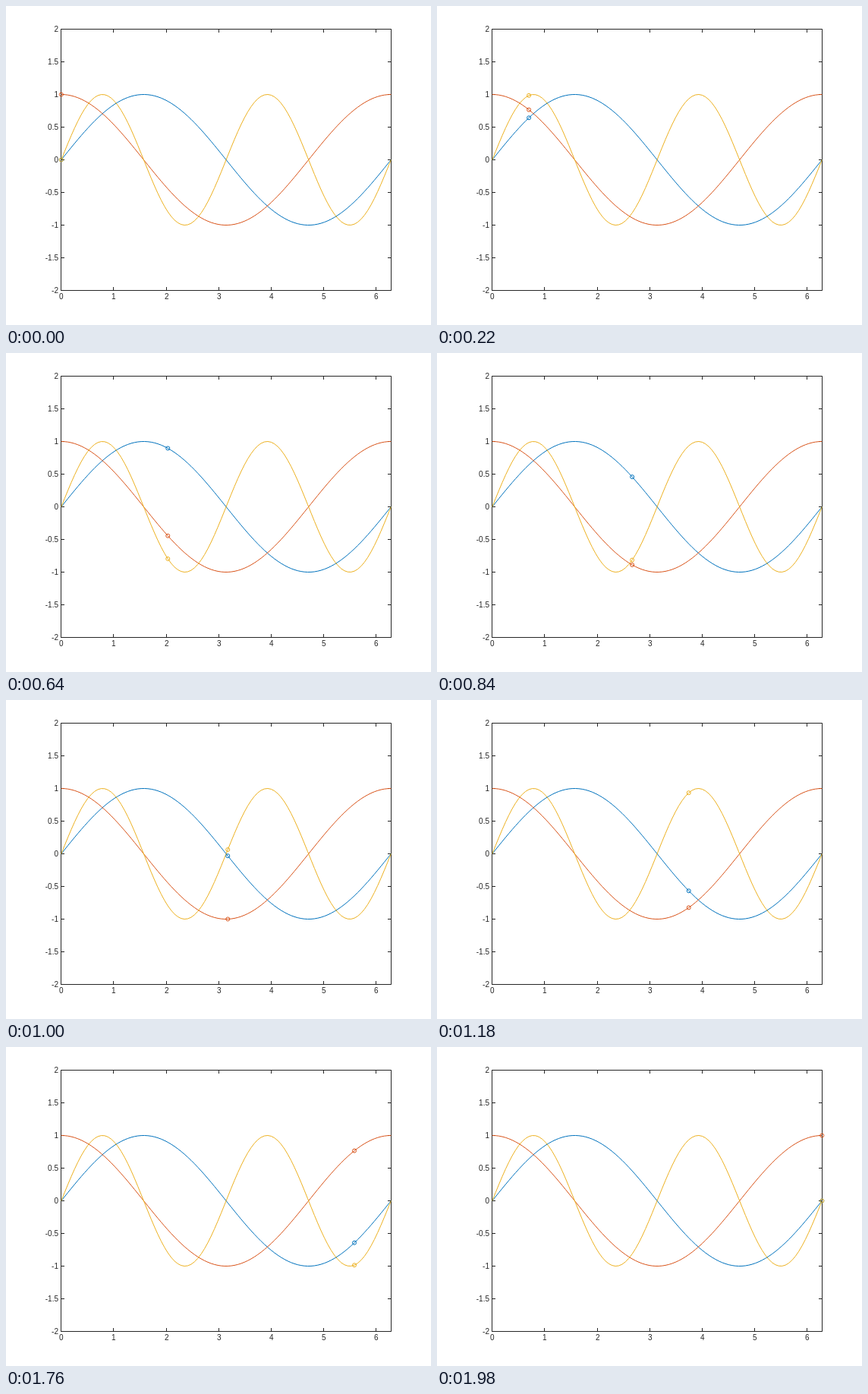
Write an HTML page that moves like this. It is 560 px wide and 420 px high and loops after 2 s.

```html
<!DOCTYPE html>
<html>
<head>
<meta charset="utf-8">
<style>
  html, body { margin: 0; width: 100%; height: 100%; overflow: hidden; background: #fff; }
  svg { display: block; }
  text { font: 10px "Liberation Sans", Arial, sans-serif; fill: #262626; }
  path, circle { fill: none; stroke-width: 1; }
</style>
</head>
<body>
<svg id="plot" width="560" height="420" viewBox="0 0 560 420"></svg>
<script>
const svg = document.getElementById('plot');
const LOOP = 2000, STEPS = 100, SPAN = 2 * Math.PI;
const LEFT = 72.5, RIGHT = 507.5, TOP = 30.5, BOTTOM = 374.5, TICK = 4.5;

const px = x => 72.8 + x / SPAN * 434.5;
const py = y => 202.5 - y * 86;
const snap = v => Math.floor(v) + 0.5;
const sample = k => SPAN * k / (STEPS - 1);

function add(tag, attrs, text = '') {
  const el = document.createElementNS('http://www.w3.org/2000/svg', tag);
  for (const name in attrs) el.setAttribute(name, attrs[name]);
  el.textContent = text;
  return svg.appendChild(el);
}

// Axes box, inward ticks on all sides, labels
let axes = `M${LEFT} ${TOP}H${RIGHT}V${BOTTOM}H${LEFT}Z`;
for (let x = 0; x <= 6; x++) {
  const p = snap(px(x));
  axes += `M${p} ${TOP}v${TICK}M${p} ${BOTTOM}v${-TICK}`;
  add('text', { x: p + 0.2, y: 385.5, 'text-anchor': 'middle' }, x);
}
for (let y = -2; y <= 2; y += 0.5) {
  const p = snap(py(y));
  axes += `M${LEFT} ${p}h${TICK}M${RIGHT} ${p}h${-TICK}`;
  add('text', { x: 69, y: p + 3.2, 'text-anchor': 'end' }, y);
}
add('path', { d: axes, stroke: '#262626' });

const curves = [
  { f: Math.sin, stroke: '#0072bd' },
  { f: Math.cos, stroke: '#d95319' },
  { f: x => Math.sin(2 * x), stroke: '#edb120' }
];
for (const { f, stroke } of curves) {
  const points = Array.from({ length: STEPS }, (_, k) => {
    const x = sample(k);
    return `${px(x).toFixed(2)} ${py(f(x)).toFixed(2)}`;
  });
  add('path', { d: 'M' + points.join('L'), stroke, 'stroke-linejoin': 'round' });
}
for (const c of curves) c.dot = add('circle', { r: 2.5, stroke: c.stroke });

function draw(now) {
  const k = Math.floor((now % LOOP) / LOOP * STEPS);
  const x = sample(k);
  for (const { f, dot } of curves) {
    dot.setAttribute('cx', px(x));
    dot.setAttribute('cy', py(f(x)));
  }
}

let start;
function tick(now) {
  start ??= now;
  draw(now - start);
  requestAnimationFrame(tick);
}
draw(0);
requestAnimationFrame(tick);
</script>
</body>
</html>
```
